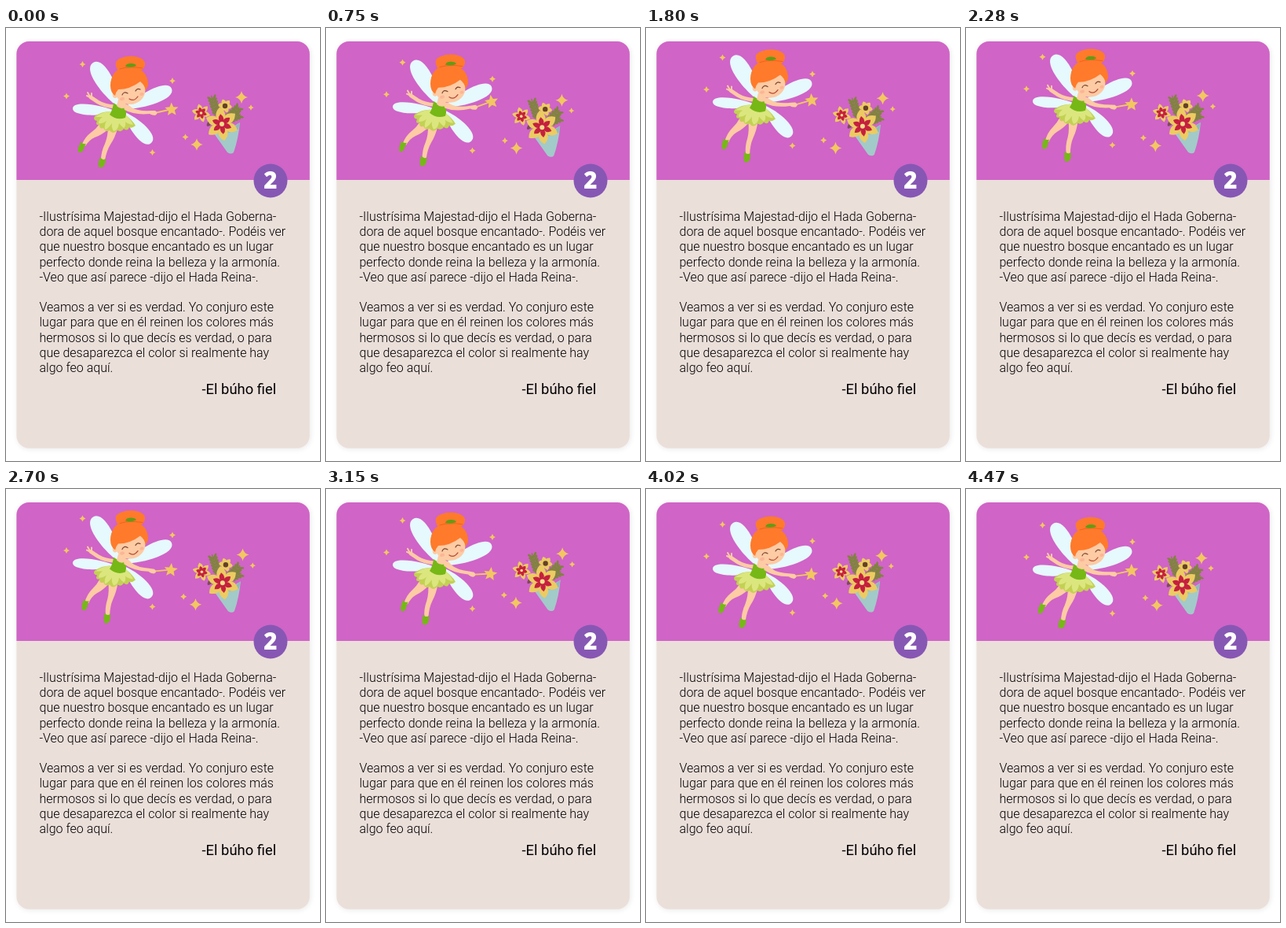
These frames come from a looping animation (400x550 px, 4500 ms). An HTML page with a canvas:

```html
<!DOCTYPE html>
<html lang="es">
<head>
<meta charset="utf-8">
<style>
  html, body { margin: 0; width: 100%; height: 100%; overflow: hidden; background: #fff; }
  canvas, p { position: absolute; margin: 0; }
  canvas { left: 0; top: 0; }
  p { white-space: nowrap; color: #000; font-family: Roboto, sans-serif; }
  .story { left: 42.5px; top: 230px; font-size: 16px; font-weight: 300; line-height: 19.2px; }
  .title { left: 249.5px; top: 448px; font-size: 18.4px; line-height: 22px; }
  .badge { left: 315px; top: 171px; width: 44px; text-align: center; color: #fff;
           font: 800 29.5px/44px "Open Sans", sans-serif; }
</style>
</head>
<body>
<canvas id="stage" width="400" height="550"></canvas>
<p class="story">-Ilustrísima Majestad-dijo el Hada Goberna-<br>dora de aquel bosque encantado-. Podéis ver<br>que nuestro bosque encantado es un lugar<br>perfecto donde reina la belleza y la armonía.<br>-Veo que así parece -dijo el Hada Reina-.<br><br>Veamos a ver si es verdad. Yo conjuro este<br>lugar para que en él reinen los colores más<br>hermosos si lo que decís es verdad, o para<br>que desaparezca el color si realmente hay<br>algo feo aquí.</p>
<p class="title">-El búho fiel</p>
<p class="badge">2</p>
<script>
const ctx = document.getElementById('stage').getContext('2d');
const LOOP = 4500, STEP = 30, TAU = Math.PI * 2, DEG = Math.PI / 180;
const SKIN = '#fdcba4', HAIR = '#ff7a2b', HAIR_DARK = '#f0621c', GREEN = '#76b816',
      WING = '#e6f9fc', SKIRT = '#dbe67f', SKIRT_DARK = '#c3d153', GOLD = '#f2c760',
      LEAF = '#80833f', PETAL = '#eccb62', RED = '#c5203f';
ctx.lineCap = ctx.lineJoin = 'round';

function fill(color, svgPath) {
  ctx.fillStyle = color;
  ctx.fill(new Path2D(svgPath));
}
function line(color, width, svgPath) {
  ctx.strokeStyle = color;
  ctx.lineWidth = width;
  ctx.stroke(new Path2D(svgPath));
}
function oval(color, x, y, rx, ry = rx, deg = 0) {
  ctx.fillStyle = color;
  ctx.beginPath();
  ctx.ellipse(x, y, rx, ry, deg * DEG, 0, TAU);
  ctx.fill();
}
function group(draw, dx, dy, px = 0, py = 0, deg = 0) {
  ctx.save();
  ctx.translate(px + dx, py + dy);
  ctx.rotate(deg * DEG);
  ctx.translate(-px, -py);
  draw();
  ctx.restore();
}

// Rounded drop, narrow at its base and widest near the tip
function wing(bx, by, tx, ty, width) {
  const len = Math.hypot(tx - bx, ty - by);
  ctx.save();
  ctx.translate(bx, by);
  ctx.rotate(Math.atan2(ty - by, tx - bx));
  fill(WING, `M0 0C${len * .35} ${-width * .7} ${len} ${-width} ${len} 0` +
             `C${len} ${width} ${len * .35} ${width * .7} 0 0Z`);
  ctx.restore();
}
function sparkle(x, y, r) {
  const k = r * .19;
  fill(GOLD, `M${x} ${y - r}Q${x + k} ${y - k} ${x + r} ${y}Q${x + k} ${y + k} ${x} ${y + r}` +
             `Q${x - k} ${y + k} ${x - r} ${y}Q${x - k} ${y - k} ${x} ${y - r}Z`);
}
function star(x, y, r, deg) {
  ctx.fillStyle = GOLD;
  ctx.beginPath();
  for (let i = 0; i < 10; i++) {
    const a = deg * DEG + i * TAU / 10, d = i % 2 ? r * .45 : r;
    ctx.lineTo(x + d * Math.cos(a), y + d * Math.sin(a));
  }
  ctx.fill();
}
// Ring of pointed petals
function petals(color, x, y, r, count, width, deg) {
  for (let i = 0; i < count; i++) {
    group(() => fill(color, `M${x} ${y}Q${x + r * .55} ${y - width * 2} ${x + r} ${y}` +
                            `Q${x + r * .55} ${y + width * 2} ${x} ${y}Z`),
          0, 0, x, y, deg + i * 360 / count);
  }
}
function fern(x, y, len, deg) {
  group(() => {
    line(LEAF, 1.3, `M${x} ${y}h${len}`);
    for (let d = 4; d <= len; d += 4) {
      for (const side of [-1, 1]) oval(LEAF, x + d, y + side * 2.8, 4.2, 1.5, side * 40);
    }
  }, 0, 0, x, y, deg);
}

function drawCard() {
  ctx.save();
  ctx.shadowColor = 'rgba(0,0,0,.09)';
  ctx.shadowBlur = 7;
  ctx.shadowOffsetX = ctx.shadowOffsetY = 1;
  ctx.fillStyle = '#ebdfda';
  ctx.beginPath();
  ctx.roundRect(13.4, 17, 373.4, 516.7, 16);
  ctx.fill();
  ctx.restore();
  ctx.fillStyle = '#d064c7';
  ctx.beginPath();
  ctx.roundRect(13.4, 17, 373.4, 176, [16, 16, 0, 0]);
  ctx.fill();
  oval('#8757b4', 337, 194, 21.5);
}

function drawBackLeg() {
  fill(SKIN, 'M120 121L131 128Q122 136 113 139Q106 142 101 150L96.5 148Q101 138 108 133Q115 128 120 121Z');
  fill(GREEN, 'M96 144Q97 148 102 147Q99 152 98 156Q94 160 92 157Q91 152 96 144Z');
}
function drawFrontLeg() {
  fill(SKIN, 'M130 125L142 128Q139 139 133 148Q128 156 126 168L121 168Q121 157 126 147Q130 137 130 125Z');
  fill(GREEN, 'M120 164Q123 169 127 166Q127 171 125 175Q121 179 118 176Q117 171 120 164Z');
}
function drawWandArm() {
  line(GOLD, 1.8, 'M185 109L207 104');
  star(211, 103.5, 9, -20);
  fill(SKIN, 'M149 97Q155 96 160 101Q168 106 185 105L190 105Q195 108 190 111Q186 111 183 109Q164 111 151 104Z');
}
function drawHead() {
  fill(SKIN, 'M143 91L153 92L152 101Q146 104 141 99Z');
  oval(HAIR, 157, 70, 23.5, 20.5, -8);
  oval(SKIN, 158.5, 80, 19, 17, -12);
  oval(SKIN, 139, 85, 3.2, 4);
  fill(HAIR, 'M133 73Q134 50 157 49Q181 51 181 73L178 79Q177 73 171 68Q158 78 143 78Q140 81 139 86Q133 82 133 73Z');
  fill(HAIR, 'M140 48Q138 41 147 38Q157 34 168 37Q178 40 177 47Q176 53 169 55L147 56Q141 54 140 48Z');
  line(HAIR_DARK, 1, 'M145 52Q157 48 174 51');
  fill('#5f9d16', 'M152 49Q153 45 159 45Q165 45 166 48Q160 51 152 49Z');
  oval('#fcb596', 148, 90, 3, 2, -15);
  oval('#fcb596', 173, 84, 2.6, 2, -15);
  line('#78442e', 1.2, 'M148 85Q150 80 155 83M165 80Q167 76 171 78');
  line('#b54a35', 1.2, 'M157 90Q163 94 168 87');
}

function drawFairy(lift, swing) {
  wing(148, 104, 111, 44, 17);
  wing(143, 107, 85, 102, 10.5);
  wing(150, 103, 211, 77, 14.5);
  wing(149, 106, 185, 146, 14);
  const legTurn = -8.7 * lift;
  group(drawBackLeg, 0, 0, 129, 122, legTurn);
  group(drawFrontLeg, 0, 0, 137, 124, legTurn);
  line(SKIN, 4.8, 'M139 100Q125 99 117 94L108 88');
  line(SKIN, 2, 'M107 88L103 86M107 87L104 82M109 87L109 83');
  fill(SKIRT_DARK, 'M132 106L153 111Q161 117 165 124Q160 128 157 126Q155 132 150 128Q147 133 142 130' +
                   'Q136 136 132 130Q127 133 124 127Q119 129 119 123Q113 124 116 118Q110 117 113 112Q122 106 132 106Z');
  fill(SKIRT, 'M132 106L153 111Q159 116 162 123Q155 122 152 119Q153 125 150 127Q146 124 144 121' +
              'Q143 130 137 131Q134 126 135 121Q130 128 126 129Q125 123 128 118Q122 122 118 121Q118 116 123 113' +
              'L114 113Q122 107 132 106Z');
  fill(GREEN, 'M137 95Q144 101 150 97Q155 106 152 114Q141 118 132 110Q136 104 137 95Z');
  group(drawWandArm, 0, 0, 151, 100, 2.5 * lift - 9 * swing);
  drawHead();
  for (const [x, y] of [[97.5, 46], [77, 86.5], [212, 67], [186.5, 158]]) sparkle(x, y, 4);
}

function drawBouquet() {
  fern(270, 112, 27, -108);
  fern(279, 118, 25, -44);
  fern(283, 117, 17, -25);
  oval('#7c4a58', 260, 120, 6, 2.6, -50);
  fill('#a2cac9', 'M260 127Q278 134 298 120Q296 141 290 158Q287 161 282 158Z');
  fill('#8ebaba', 'M266 131Q285 133 298 120L296 129Q282 136 266 131Z');
  petals(PETAL, 279, 99, 9, 6, 3, 10);
  oval('#65402a', 279, 99, 3.2);
  petals(PETAL, 248.5, 108, 12, 6, 3.2, 15);
  petals(RED, 248.5, 108, 7.5, 6, 2.2, 15);
  oval('#f7dc8b', 248.5, 108, 1.8);
  petals(PETAL, 275, 122, 21.5, 6, 6, 22);
  petals(RED, 275, 122, 13, 6, 3.2, 22);
  oval(RED, 275, 122, 5);
  oval('#f7dc8b', 275, 122, 3);
}

function render(now) {
  const t = Math.floor(now % LOOP / STEP) * STEP;
  const swing = Math.sin(TAU * t / LOOP);
  const lift = (1 - Math.cos(TAU * t / LOOP)) / 2;
  const spread = 1 + .06 * lift;

  ctx.clearRect(0, 0, 400, 550);
  drawCard();
  group(() => drawFairy(lift, swing), 0, -9.3 * lift);
  group(() => {
    group(drawBouquet, lift, 0);
    for (const [x, y, r] of [[300, 88, 8], [312, 101, 3.7], [243, 148, 7.8], [228.5, 138.5, 4]]) {
      sparkle(271 + (x - 271) * spread, 118 + (y - 118) * spread, r);
    }
  }, 0, 4.8 * swing);
  requestAnimationFrame(render);
}
const start = performance.now();
requestAnimationFrame(now => render(Math.max(0, now - start)));
</script>
</body>
</html>
```
